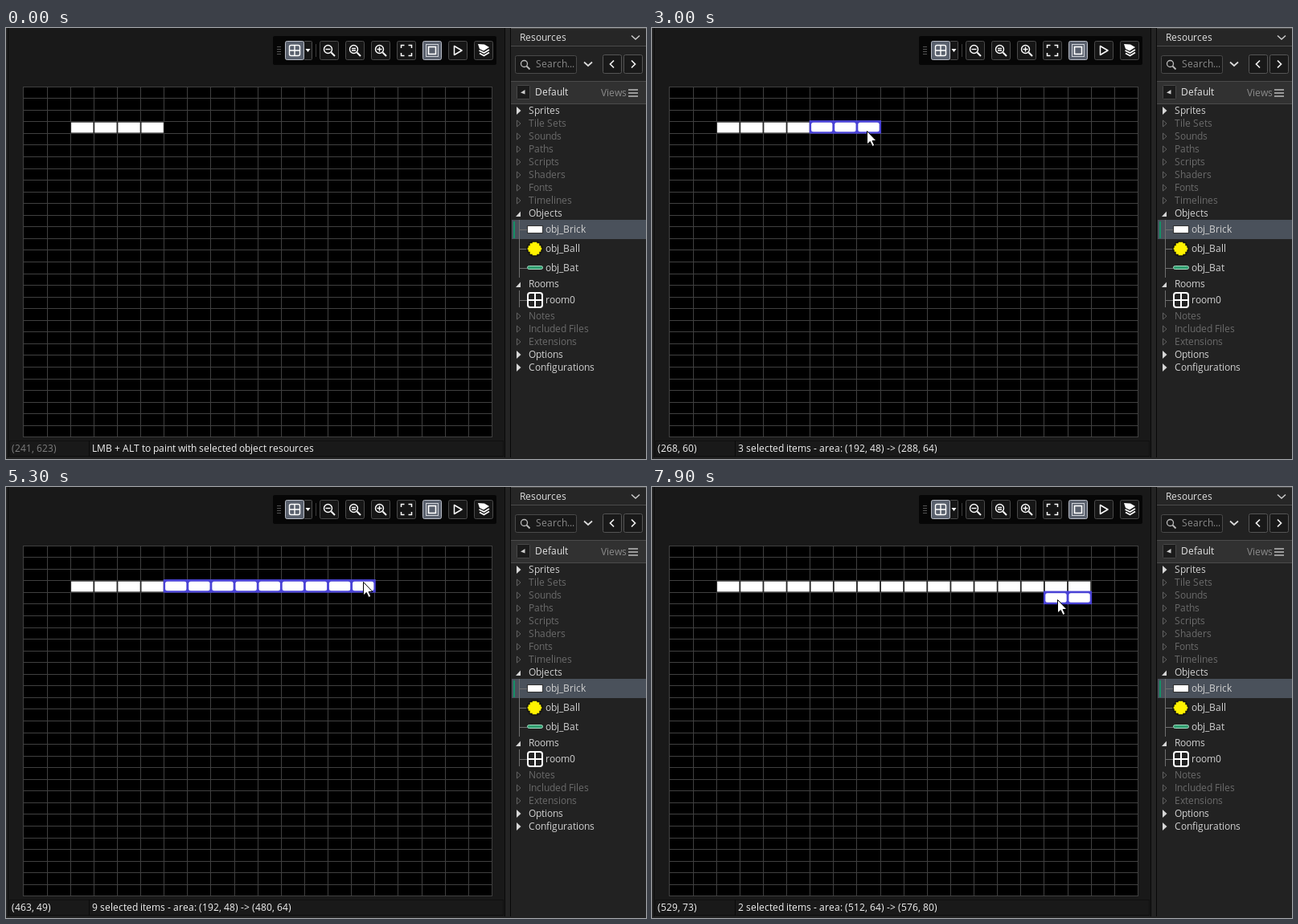
Animation of 796 by 537 pixels, one loop 8 s. Source, as an HTML page:

```html
<!DOCTYPE html>
<html lang="en">
<head>
<meta charset="utf-8">
<title>Room editor</title>
<style>
  html, body { margin: 0; width: 100%; height: 100%; overflow: hidden; background: #191919; }
  svg { display: block; width: 796px; height: 537px; font: 12px "Open Sans", "Noto Sans", sans-serif; }
  text { white-space: pre; }
</style>
</head>
<body>
<svg id="stage" viewBox="0 0 796 537"></svg>
<script>
const LOOP = 8000, STEP = 100;
const SCALE = 0.91, LEFT = 21.98, TOP = 73.08;
const CELL_W = 32, CELL_H = 16;
const PAINT_FIRST = 2000, PAINT_SECOND = 7400;

// Pointer path in room coordinates: time, x, y
const PATH = [
  [0, 241, 623], [100, 222, 492], [500, 221, 270], [900, 220, 144], [1400, 213, 76],
  [1800, 208, 50], [2100, 207, 56], [2700, 245, 61], [3000, 268, 60], [3600, 296, 56],
  [4300, 382, 48], [4500, 392, 48], [4600, 402, 48], [5300, 463, 49], [5400, 472, 49],
  [5800, 507, 41], [6300, 541, 44], [6900, 566, 48], [7200, 566, 51], [7400, 562, 68],
  [7900, 529, 73]
];

const stage = document.getElementById("stage");
const ruler = document.createElement("canvas").getContext("2d");
ruler.font = '12px "Open Sans", "Noto Sans", sans-serif';

function add(tag, attrs, parent = stage) {
  const node = document.createElementNS("http://www.w3.org/2000/svg", tag);
  for (const key in attrs) node.setAttribute(key, attrs[key]);
  parent.appendChild(node);
  return node;
}
const rect = (x, y, width, height, fill, more, parent) =>
  add("rect", { x, y, width, height, fill, ...more }, parent);
const line = (d, stroke, width = 1, more) =>
  add("path", { d, stroke, "stroke-width": width, fill: "none", ...more });
const shape = (d, fill, more, parent) => add("path", { d, fill, ...more }, parent);
const box = (x, y, w, h, fill, stroke, rx = 0) =>
  rect(x + .5, y + .5, w - 1, h - 1, fill, { stroke, rx });

// Sets text with every glyph advance rounded to whole pixels, as the editor's UI does.
function write(node, left, content) {
  if (node.textContent === content) return;
  let x = left;
  const starts = [...content].map(char => {
    const start = x;
    x += Math.round(ruler.measureText(char).width);
    return start;
  });
  node.setAttribute("x", starts.join(" "));
  node.textContent = content;
}
function label(x, y, content, fill = "#d0d0d0") {
  const node = add("text", { y, fill });
  write(node, x, content);
  return node;
}

const roomX = x => LEFT + x * SCALE;
const roomY = y => TOP + y * SCALE;

function drawRoom() {
  rect(0, 0, 796, 537, "#191919");
  rect(0, 0, 2, 537, "#232323");
  rect(2, 0, 1, 537, "#0a0a0a");
  rect(21, 73, 584, 437, "#000");
  let d = "";
  for (let i = 0; i <= 20; i++) d += `M${Math.floor(roomX(i * CELL_W)) + .5} 73V510`;
  for (let j = 0; j <= 30; j++) d += `M21 ${Math.floor(roomY(j * CELL_H)) + .5}H605`;
  line(d, "#404040");
}

function drawToolbar() {
  rect(332, 10, 278, 36, "#060606", { rx: 2 });
  for (let y = 23; y < 35; y += 3) line(`M337 ${y + .5}h5`, "#555");
  box(370, 16, 11, 24, "#161616", "#4a4a4a", 1);
  [347, 390, 422, 454, 486, 518, 550, 582].forEach(x => {
    const on = x === 347 || x === 518;
    box(x, 16, 24, 24, on ? "#59606d" : "#161616", on ? "#b9bdc6" : "#4a4a4a", 2);
  });
  shape("M372.5 26h6l-3 4z", "#fff");
  line("M385.5 20v16", "#3a3a3a");
  rect(352.5, 21.5, 13, 13, "none", { stroke: "#fff", "stroke-width": 1.4, rx: 2 });
  line("M359 21v14M352 28h14", "#fff", 1.4);
  [402, 434, 466].forEach((x, i) => {
    add("circle", { cx: x - 1.5, cy: 26.5, r: 5, fill: "none", stroke: "#fff", "stroke-width": 1.4 });
    line(`M${x + 2.5} 30.5l4.500 4.500`, "#fff", 2);
    const marks = ["M-4.5 26.5h6", "M-4 25.5h5M-4 28h5", "M-4.5 26.5h6M-1.5 23.5v6"];
    line(marks[i], "#fff", 1.4, { transform: `translate(${x})` });
  });
  line("M491.500 25v-3.500h4M500.500 21.500h4v3.500M504.500 31v3.500h-4M495.500 34.500h-4v-3.500", "#fff", 1.5);
  rect(522.5, 20.5, 15, 15, "none", { stroke: "#d0d3d9" });
  rect(525.5, 23.5, 9, 9, "none", { stroke: "#fff", "stroke-width": 1.6 });
  line("M557.500 22.500v11l9.500-5.500z", "#fff", 1.5, { "stroke-linejoin": "round" });
  shape("M587 20l8 .5 6 3.500-7 4.500-5-2.500z", "#fff");
  line("M588.500 28l6 3 6.500-4M589 31.500l5.500 3 6.500-4", "#fff", 1.7);
}

function drawSidebar() {
  rect(620, 0, 1, 537, "#080808");
  rect(621, 0, 6, 537, "#242424");
  rect(627, 0, 1, 537, "#080808");
  rect(628, 0, 168, 537, "#222");
  rect(628, 0, 168, 23, "#262626");
  line("M628 .5H796M628 22.500H796", "#4b4b4b");
  label(639, 16, "Resources", "#e0e0e0");
  line("M778 9.500l5 4.500 5-4.500", "#ccc", 1.5);

  box(633, 34, 77, 23, "#191919", "#4a4a4a", 2);
  add("circle", { cx: 644.5, cy: 44.5, r: 4, fill: "none", stroke: "#bbb", "stroke-width": 1.3 });
  line("M647.500 47.500l4 4", "#bbb", 1.8);
  label(659, 49, "Search...", "#8a8a8a");
  line("M719 42.500l5 4.500 5-4.500", "#ddd", 1.7);
  [742, 768].forEach(x => box(x, 33, 24, 24, "#191919", "#555", 2));
  line("M756 40.500l-4.500 4.500 4.500 4.500M778 40.500l4.500 4.500-4.500 4.500", "#eee", 1.7);

  rect(628, 66, 168, 29, "#313131");
  line("M628 66.500H796M628 94.500H796", "#4b4b4b");
  box(635, 71, 17, 18, "#1b1b1b", "#484848", 1);
  shape("M640 80.500l5.500-3.500v5.500z", "#ccc");
  label(658, 84, "Default", "#e4e4e4");
  label(740, 85, "Views", "#8b8b8b");
  line("M774 77h12M774 81h12M774 85h12", "#bbb", 1.5);
}

function drawTree() {
  const entry = (y, name, kind) => {
    const off = kind === "off";
    if (kind === "open") shape(`M634 ${y + 4}l6-6.500v6.500z`, "#d6d6d6");
    else if (off) line(`M635.500 ${y - 4}l4.500 4-4.500 4z`, "#616161");
    else shape(`M635 ${y - 5}l5.500 5-5.500 5z`, "#d6d6d6");
    label(650, y + 4, name, off ? "#6a6a6a" : undefined);
  };
  entry(103, "Sprites");
  ["Tile Sets", "Sounds", "Paths", "Scripts", "Shaders", "Fonts", "Timelines"]
    .forEach((name, i) => entry(119 + i * 16, name, "off"));
  entry(231, "Objects", "open");
  entry(319, "Rooms", "open");
  ["Notes", "Included Files", "Extensions"].forEach((name, i) => entry(359 + i * 16, name, "off"));
  entry(407, "Options");
  entry(423, "Configurations");

  rect(629, 239, 167, 24, "#4a515b");
  rect(631, 241, 2, 21, "#159067");
  line("M638.500 239V311M638.500 251.500H648M638.500 275.500H648M638.500 299.500H648M638.500 327V348M638.500 339.500H648", "#707070");

  rect(648.5, 246.5, 19, 9, "#fff", { stroke: "#333" });
  shape("M654 266h7v1.500h3v3h2v2.500h1v4h-1v2.500h-2v3h-3v1.500h-7v-1.500h-3v-3h-2v-2.500h-1v-4h1v-2.500h2v-3h3z",
    "#fff200", { stroke: "#111", "stroke-width": 1.4 });
  rect(648.5, 296.5, 19, 4, "#2f9f70", { stroke: "#a5d8c0", rx: 2 });
  rect(649, 330, 18, 18, "none", { stroke: "#fff", "stroke-width": 2, rx: 3 });
  line("M658 330v18M649 339h18", "#fff", 2);
  ["obj_Brick", "obj_Ball", "obj_Bat"].forEach((name, i) => label(671, 255 + i * 24, name));
  label(671, 343, "room0");
}

function drawStatusBar() {
  box(4, 514, 615, 20, "#191919", "#101010");
  line("M103.500 514v20", "#0a0a0a");
  rect(0, 535, 628, 2, "#222");
}

drawRoom();
drawToolbar();
drawSidebar();
drawTree();
drawStatusBar();

function makeBrick(col, row) {
  const x = roomX(col * CELL_W), y = roomY(row * CELL_H);
  const w = CELL_W * SCALE, h = CELL_H * SCALE;
  const node = add("g", {});
  const plain = add("g", {}, node), picked = add("g", {}, node);
  rect(x, y, w, h, "#222", {}, plain);
  rect(x + SCALE, y + SCALE, w - 2 * SCALE, h - 2 * SCALE, "#fff", {}, plain);
  rect(x, y - .7, w, h, "#4a43d6", { stroke: "#4a43d6", "stroke-width": 2 }, picked);
  rect(x + 1.4, y + .9, w - 2.8, h - 3, "#fff", { rx: 2.5 }, picked);
  return {
    show(visible, selected) {
      node.style.display = visible ? "" : "none";
      plain.style.display = selected ? "none" : "";
      picked.style.display = selected ? "" : "none";
    }
  };
}

const topRow = Array.from({ length: 16 }, (_, i) => makeBrick(i + 2, 3));
const nextRow = [17, 16].map(col => makeBrick(col, 4));
const coords = label(7, 528, "");
const message = label(107, 528, "", "#f2f2f2");
const pointer = shape("M0 0V16.500L3.800 13L6.600 19L9.300 17.800L6.600 12H11.500Z", "#fff",
  { stroke: "#000", "stroke-width": 1, "stroke-linejoin": "round" });

function pointerAt(t) {
  const next = PATH.findIndex(p => p[0] > t);
  if (next < 0) return PATH[PATH.length - 1].slice(1);
  const a = PATH[next - 1], b = PATH[next], k = (t - a[0]) / (b[0] - a[0]);
  return [1, 2].map(i => Math.round(a[i] + (b[i] - a[i]) * k));
}

function describe(count, x, y, right, id) {
  return count === 1
    ? `inst_${id}: (${x}, ${y})`
    : `${count} selected items - area: (${x}, ${y}) -> (${right}, ${y + CELL_H})`;
}

function render(t) {
  const [x, y] = pointerAt(t);
  const column = Math.floor(x / CELL_W);
  const second = t >= PAINT_SECOND;
  const added = t < PAINT_FIRST ? 0 : second ? 12 : column - 5;
  const below = second ? 18 - column : 0;

  topRow.forEach((brick, i) => brick.show(i < 4 + added, i >= 4 && !second));
  nextRow.forEach((brick, i) => brick.show(i < below, true));

  write(coords, 7, `(${x}, ${y})`);
  coords.setAttribute("fill", t < STEP ? "#7d7d7d" : "#f2f2f2");
  write(message, 107, second ? describe(below, column * CELL_W, 64, 576, "2B84E1A6")
    : added ? describe(added, 192, 48, (column + 1) * CELL_W, "5F0DC723")
    : "LMB + ALT to paint with selected object resources");

  pointer.setAttribute("transform",
    `translate(${Math.round(roomX(x)) + 1.5} ${Math.round(roomY(y)) + .5})`);
}

function tick(now) {
  render(Math.floor(now % LOOP / STEP) * STEP);
  requestAnimationFrame(tick);
}
render(0);
requestAnimationFrame(tick);
</script>
</body>
</html>
```
